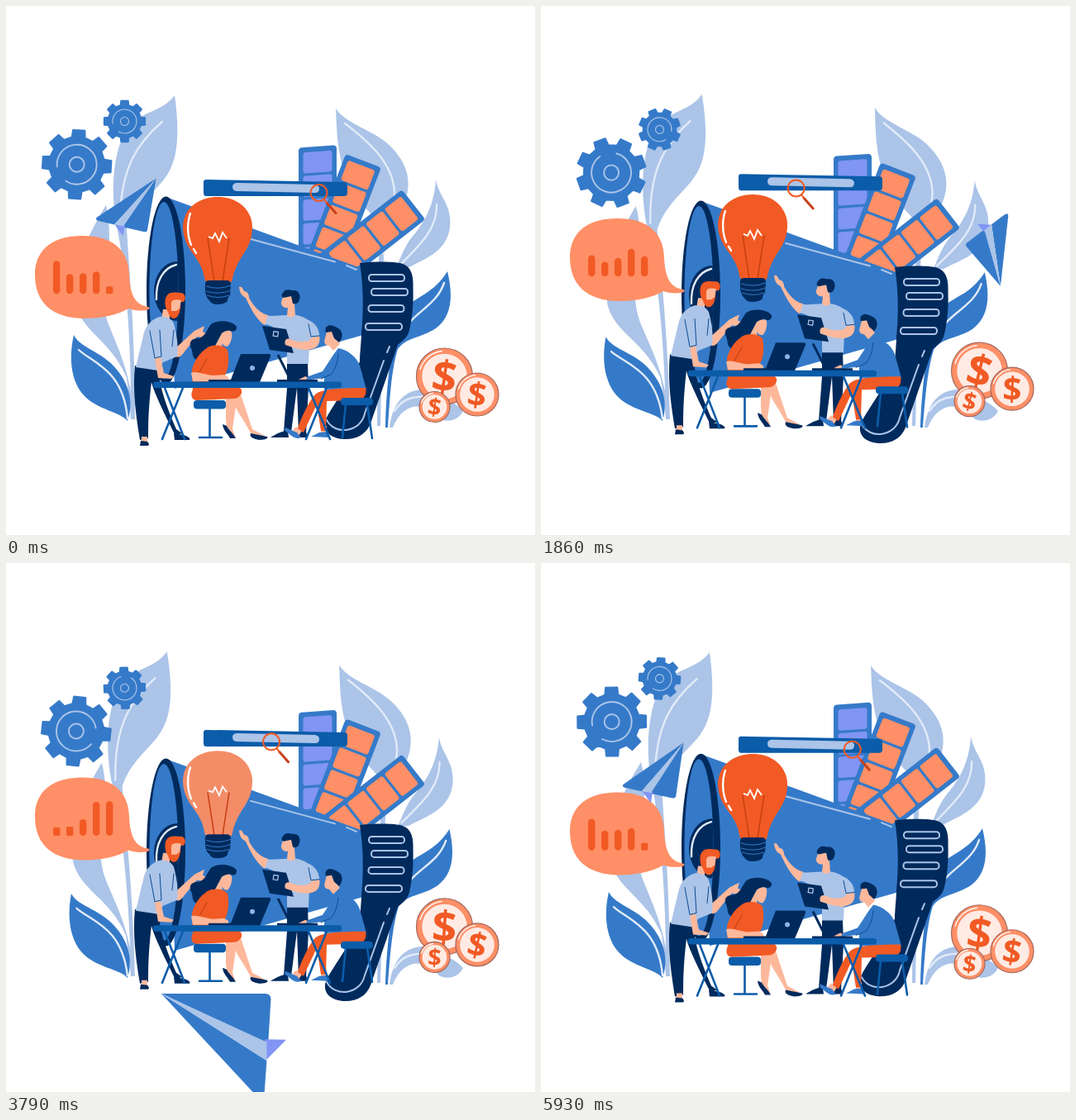
Animation, 640 px wide and 640 px high, one loop 6 s. Source, as an HTML page:

```html
<!DOCTYPE html>
<html lang="en">
<head>
<meta charset="utf-8">
<title>Team and megaphone</title>
<style>
html,body{margin:0;width:100%;height:100%;overflow:hidden;background:#fff}
svg{display:block;width:100%;height:100%}
.b{fill:#357ac9}.l{fill:#abc4e8}.n{fill:#002a5c}.m{fill:#0b5ca9}
.o{fill:#f15a24}.p{fill:#ff8f66}.s{fill:#fdb89b}.v{fill:#8095f4}
.ll,.lw,.lm,.ln{fill:none;stroke-linecap:round;stroke-linejoin:round}
.ll{stroke:#abc4e8;stroke-width:2}
.lw{stroke:#e1ebf8;stroke-width:2.4}
.lm{stroke:#0b5ca9;stroke-width:2.6}
.ln{stroke:#0b4c94;stroke-width:1}
text{font:bold 50px "Open Sans","Noto Sans",sans-serif;text-anchor:middle;fill:#f15a24}
</style>
</head>
<body>
<svg viewBox="0 0 640 640">
<g data-sway="-1.7" data-root="154 500"><path class="l" d="M121 241C100 275 78 320 84 360C92 395 128 405 146 450Q150 475 151 500H154C153 450 138 420 124 385C110 350 122 300 125 290C125 270 125 255 121 241Z"/></g>
<g id="tall"><path class="l" d="M204 108C208 135 210 170 201 192C190 222 160 232 146 270C150 330 156 400 156 500H151C152 420 146 320 133 262C126 220 130 165 152 142C166 128 192 126 204 108Z"/><path class="lw" d="M189 140C160 165 138 195 138 262"/></g>
<g data-sway="-2.4" data-root="148 502"><path class="b" d="M82 398C90 415 120 418 138 445C152 465 153 485 147 502C140 492 110 488 95 472C76 452 77 420 82 398Z"/><path class="lw" d="M88 416C105 432 142 440 147 499"/></g>
<g data-sway=".9" data-root="452 505"><path class="l" d="M399 124C412 145 450 150 470 175C492 200 489 225 479 245C468 265 460 270 457 300L453 508H449L451 300C450 280 452 270 445 255C425 235 412 215 406 190C400 165 400 145 399 124Z"/><path class="lw" d="M410 142C440 165 468 190 470 225C470 250 458 270 457 300"/></g>
<g data-sway="1.1" data-root="465 505"><path class="l" d="M520 210C524 232 540 240 537 268C533 300 500 308 484 318H472C480 296 486 285 495 275C508 258 518 240 520 210Z"/><path class="lw" d="M521 240C522 270 500 290 476 314"/></g>
<g data-sway="1.1" data-root="462 505"><path class="b" d="M534 321C541 350 540 375 520 390C500 403 485 400 474 415C466 440 464 480 462 510H459C460 460 466 400 480 370C490 352 515 352 534 321Z"/><path class="lw" d="M530 335C520 365 490 370 477 400"/></g>
<path class="l" d="M464 510C468 478 484 462 512 464C530 475 545 480 553 490C546 503 532 504 524 499C508 478 480 478 468 510Z"/><path class="lw" d="M470 490C480 474 495 470 520 474"/>

<g id="gearA"></g><g id="gearB"></g>
<g id="fan"></g>

<g id="horn">
<path class="b" d="M196 232L432 318V398L204 463Z"/>
<path class="ll" d="M296 282L398 309.5M412 314L424 319"/>
<ellipse class="n" cx="193.5" cy="344" rx="23.5" ry="113.5"/>
<clipPath id="mouth"><ellipse cx="191" cy="344" rx="17.5" ry="107"/></clipPath>
<g clip-path="url(#mouth)"><path class="b" d="M170 230h50v230h-50z"/><ellipse class="n" cx="207" cy="345" rx="28" ry="36"/><path class="lw" d="M206 313C190 317 181 333 182 355"/></g>
<path class="n" d="M428 311C450 309 470 309 480 312C490 316 493 325 492.500 340C493 360 492 375 488 392C486 402 478 406 474 410L441 505C436 518 424 525 408 524C390 523 383 512 387 500C392 488 420 450 428 430C428 420 430 405 430 395C433 365 432 335 428 311Z"/>
<g class="ll"><rect x="439" y="325" width="43" height="8" rx="3.500"/><rect x="442" y="342" width="44" height="8" rx="3.500"/><rect x="438.500" y="362" width="43" height="8" rx="3.500"/><rect x="435" y="384" width="44" height="8" rx="3.500"/></g>
<path class="ll" d="M464 412L461 419M457 429L434 493C429 516 398 520 388 501"/>
</g>

<g id="bulb">
<path id="glass" d="M256 231C282 231 299 248 298 270C297 296 280 302 274 330C273 337 266 338 257 338C248 338 241 336 240 329C236 302 215 297 214 268C214 246 232 231 256 231Z"/>
<path d="M244 281L252 333M270 281L262 333" fill="none" stroke="#c63f10" stroke-width="1.5"/>
<path d="M245 279L250 281L253 275L258 285L262 274L267 281" fill="none" stroke="#fff" stroke-width="1.800"/>
<path class="lw" style="stroke:#fff" d="M223 251C219 262 219 277 224 289M227 294L230 299"/>
<path class="n" d="M241 336Q241 332 246 332H267Q272 332 272 337L271 350Q268 352 268 357Q264 361 256 361Q248 361 246 356Q240 352 241 336Z"/>
<path d="M242 339Q257 344 272 338M242 345Q257 350 272 344M243 350Q257 355 270 350" fill="none" stroke="#357ac9"/>
</g>

<g id="search"><path class="m" d="M242 210L410 213Q413 213 413 217V226Q413 230 409 230H242Q239 230 239 226V213Q239 210 242 210Z"/><path class="l" d="M280 214L374 216Q379 217 379 221Q379 226 374 226L280 224Q274 224 274 219Q274 214 280 214Z"/></g>
<g id="lens" fill="none" stroke-linecap="round"><path d="M388 238L399 250.500" stroke="#c6421a" stroke-width="3"/><path d="M385 234L388 238" stroke="#f15a24" stroke-width="2"/><circle cx="378.500" cy="226" r="10" stroke="#f15a24" stroke-width="2"/></g>

<g id="bubble"><path class="p" d="M90 278C125 277 148 292 149 325C150 352 158 362 172 364C175 365 174 367 170 368C160 369 154 368 148 366C135 374 115 378 95 378C55 378 35 358 35 325C35 300 50 279 90 278Z"/><g id="bars" class="o"></g></g>

<g id="team">
<path class="n" d="M340 432H365L366 462L363 517H354L352 462L345 516L336 515L340 462Z"/>
<path class="n" d="M320 522C328 517 334 514 341 514L342 522ZM355 515H363L365 522H354Z"/>
<path class="l" d="M314 374C320 376 330 374 340 374H352C362 376 370 382 373 390L367 410L366 433H340V405C335 398 325 386 312 385Z"/>
<path class="s" d="M313 386C303 380 294 362 290 353C284 350 283 346 282 340C284 338 287 342 288 345C292 345 294 349 294 353C300 364 308 372 317 374Z"/>
<path class="s" d="M335 352L346 351L349 361L350 374C346 378 341 376 340 374L341 365C336 366 332 362 333 358Z"/>
<path class="n" d="M335 347C338 341 344 344 347 344C354 343 357 350 355 355C354 360 350 361 347 360L345 351L336 353C333 352 333 349 335 347Z"/>
<path d="M329 422L341 446" stroke="#002a5c" stroke-width="3"/>
<path class="n" d="M310 387L339 391L348 420L319 416Z"/>
<rect class="ll" x="323.500" y="394" width="5.500" height="5.500" style="stroke-width:1.300" transform="rotate(8 326 397)"/>
<path class="s" d="M373 388C380 395 382 406 376 412C366 420 350 414 338 410C336 404 340 400 346 404C356 408 366 406 369 403L364 398Z"/>
<path class="l" d="M356 378C370 378 379 388 379 399L367 402Z"/><path class="ln" d="M366 385L369 400L379 399"/>

<path class="n" d="M156 435L186 441C184 455 192 480 206 512L213 517L205 520C190 490 178 465 176 455C173 480 172 500 172 523L162 525C157 495 153 465 156 435Z"/>
<path class="s" d="M164 521H171V528H164ZM190 367H198V382L188 380Z"/>
<path class="n" d="M163 526L171 527C174 530 173 532 171 532H162ZM203 517L214 519C219 520 224 523 222 525H204Z"/>
<path class="s" d="M202 421C208 428 212 424 216 418L231 400L244 402L246 398L238 394L240 387L228 393L205 414Z"/>
<path class="l" d="M186 376C178 378 170 385 167 395L157 437L184 441L190 431L207 424C209 410 206 395 203 384C200 378 194 375 186 376Z"/>
<path class="s" d="M180 426L187 425L191 444L203 448L200 451L184 450Z"/>
<path class="ln" d="M174 393L180 426L188 424L186 392M203 392L201 412"/>
<path class="o" d="M195 350C198 345 207 347 210 347C216 346 219 353 215 358H211C212 365 210 374 206 377C201 380 197 375 196 370C192 366 191 354 195 350Z"/>
<path class="s" d="M200 359C201 354 208 355 212 356L210 366L206 369L200 369Z"/>

<path class="s" d="M266 474C272 470 284 464 286 476L298 512L313 520L298 521C288 500 280 492 278 485L274 512L277 520L268 518L266 500Z"/>
<path class="n" d="M262 506L267 508C270 514 276 518 278 523H271C268 517 263 514 262 506ZM296 517L316 521C318 524 312 525 306 525C300 524 294 522 296 517Z"/>
<rect class="m" x="227" y="477" width="39" height="10.500" rx="4"/><path class="lm" d="M246.500 487V521M234 522H261"/>
<path class="n" d="M248 385C256 379 274 380 279 388C280 394 273 395 270 392C262 397 262 406 258 412C252 424 240 428 230 428C224 424 227 420 224 414C220 406 226 402 232 402C240 402 244 390 248 385Z"/>
<path class="s" d="M261 396C266 392 272 392 273 395C274 401 272 408 268 412C264 412 262 409 261 408L262 415L252 413Z"/>
<path class="o" d="M244 413C252 409 263 410 268 416C270 425 270 440 264 448L283 462C288 466 284 474 276 475L231 477C224 477 223 470 226 464L225 440C228 428 235 419 244 413Z"/>
<path class="s" d="M224 444C228 441 240 446 250 447L264 446L269 449V454H226Z"/>
<path d="M234 443L243 427" stroke="#b63a14"/>

<path class="s" d="M381 508H388V518H381ZM351 509L358 514L354 520L347 513ZM354 452L362 448L368 451L364 455Z"/>
<path class="b" d="M402 414C413 416 424 424 428 435L436 464H385V450L362 453L366 448L383 442L396 422Z"/><path class="ln" d="M402 421C401 432 398 440 393 446L381 451"/>
<path class="s" d="M388 394H395L399 403L404 409L396 417L391 411C386 411 384 407 386 402Z"/>
<path class="n" d="M388 388C392 384 398 388 402 390C408 393 408 402 403 407L397 402L394 394L387 395C386 392 386 390 388 388Z"/>
<path class="o" d="M435 462C437 472 432 476 425 477L388 478L387 514H381L376 482L360 516L353 511C358 496 368 476 374 470C380 464 400 462 435 462Z"/>
<path class="b" d="M338 510L352 516L357 522C350 526 342 517 337 513ZM369 521L379 516L389 515L390 522Z"/>
<rect class="m" x="405" y="474" width="39" height="9" rx="4"/><path class="lm" d="M411 482L407 522M437 482L443 523"/>
<path class="n" d="M284 421H318Q321 421 320 424L307 455H245V452H272ZM328 452H377V455H328Z"/><circle cx="298" cy="438" r="3" fill="#8fb3e4"/>
<path class="lm" d="M214 462L189 524M192 462L216 524M388 462L363 524M366 462L392 524"/>
<rect class="m" x="178" y="454.500" width="228" height="7.500" rx="3"/>
</g>

<g id="coins"></g>
<g id="plane"><path class="b" d="M0 0L90 -74Q95 -78 99 -73L128 -33Z"/><path class="v" d="M122 -34L141 -49L138 -17Z"/><path class="b" d="M0 0L139 -17L161 14Q164 21 157 21Z"/><path class="l" d="M0 0L126 -33L139 -17Z"/></g>
</svg>
<script>
const LOOP = 6000, TAU = Math.PI * 2;
const $ = id => document.getElementById(id);
const place = (id, v) => $(id).setAttribute('transform', v);
const shift = (id, y, x = 0) => place(id, `translate(${x} ${y})`);

// Rises from 0 to 1 between start and top, falls back between fall and end
const pulse = (t, start, top, fall, end) =>
  Math.max(0, Math.min(1, (t - start) / (top - start), (end - t) / (end - fall)));
// One linear rise and fall per loop
const ramp = (t, peak) => pulse(t, 0, peak, peak, LOOP);

function gear(id, r, root, ring, hub) {
  const pts = [];
  for (let i = 0; i < 8; i++)
    for (const [a, d] of [[-.24, root], [-.17, r], [.17, r], [.24, root]]) {
      const q = i * TAU / 8 + a;
      pts.push(d * Math.cos(q) + ' ' + d * Math.sin(q));
    }
  $(id).innerHTML = `<path class="b" d="M${pts.join('L')}Z" stroke="#357ac9" stroke-width="2" stroke-linejoin="round"/>
    <circle class="ll" r="${ring}" pathLength="360" stroke-dasharray="310 50" transform="rotate(170)" style="stroke-width:${r / 22}"/>
    <circle class="ll" r="${hub}" style="stroke-width:${r / 22}"/>`;
}
gear('gearA', 42, 33.5, 24, 9);
gear('gearB', 25, 20, 14.5, 5);

function card(pose, cell) {
  let s = `<g transform="${pose}"><rect class="b" width="46" height="145" rx="4"/>`;
  for (let i = 0; i < 5; i++)
    s += `<rect class="${cell}" x="5.5" y="${6 + i * 28.7}" width="35" height="25.5" rx="3"/>`;
  return s + '</g>';
}
$('fan').innerHTML = card('translate(354 171.500) skewY(-4)', 'v') +
  card('translate(411 179) rotate(21)', 'p') +
  card('translate(479 222) rotate(52)', 'p');

// Each bar: resting and opposite height
const bars = [[40, 10], [24, 11], [25, 20], [27, 41], [9, 42]];
$('bars').innerHTML = bars.map((_, i) => `<rect x="${57 + i * 16}" width="8.4"/>`).join('');

const coins = [[530.5, 448, 34], [570, 470, 26], [518.5, 485, 18.5]];
$('coins').innerHTML = coins.map(([x, y, r]) => `<g transform="translate(${x} ${y})">
  <circle class="p" r="${r}" stroke="#a5665a" stroke-width="1.2"/>
  <circle r="${r * .8}" fill="#ffebe4"/>
  <circle r="${r * .9}" fill="none" stroke="#fff" stroke-width="1.3" pathLength="360" stroke-dasharray="70 290" transform="rotate(195)"/>
  <text dy=".36em" style="font-size:${r * 1.55}px">$</text></g>`).join('');

// The plane circles the scene on an ellipse, growing as it nears the viewer
function fly(t) {
  const q = t / LOOP * TAU;
  const orbit = 219 + t / LOOP * 360 + 10 * (1 - Math.cos(q)) - 6 * Math.sin(q);
  const a = orbit * TAU / 360;
  const turn = orbit - 80 + 16 * ramp(t, 3000) + 35 * pulse(t, 3800, 4800, 4800, LOOP);
  const size = .54 + .54 * pulse(t, 1900, 3300, 3800, LOOP);
  place('plane', `translate(${333 + 230 * Math.cos(a)} ${370 + 203 * Math.sin(a)})
    rotate(${turn}) scale(${size}) translate(-79 14)`);
}

function draw(t) {
  const u = t / LOOP, rise = ramp(t, 3000);
  const sway = .22 * (1 - Math.cos(u * TAU)) + .3 * (1 - Math.cos(2 * u * TAU));

  document.querySelectorAll('[data-sway]').forEach(leaf =>
    leaf.setAttribute('transform', `rotate(${leaf.dataset.sway * sway} ${leaf.dataset.root})`));
  place('tall', `rotate(${-.95 * (sway + rise)} 152 500)`);

  place('gearA', `translate(${85.7 - rise} ${191.7 + 16 * rise}) rotate(${u * 360 + 3.5})`);
  place('gearB', `translate(143.500 ${139.5 + 16 * rise}) rotate(${-u * 360})`);
  shift('fan', 14.5 * ramp(t, 2600));
  shift('horn', 8 * rise);
  shift('bulb', -5 * rise);
  shift('search', -11 * rise);
  shift('lens', -11 * pulse(t, 1100, 2600, 3500, LOOP), -78 * pulse(t, 1100, 1950, 3000, LOOP));
  shift('team', -22 * rise);
  shift('coins', -11 * rise);
  shift('bubble', -28.7 * ramp(t, 2550));

  const pale = pulse(t, 2450, 3700, 4900, 5750);
  $('glass').setAttribute('fill', `rgb(${241 + 2 * pale},${90 + 51 * pale},${36 + 68 * pale})`);

  bars.forEach(([rest, other], i) => {
    const h = rest + (other - rest) * pulse(t, 1100, 2700, 4900 - 280 * i, LOOP - 200 * i);
    const bar = $('bars').children[i];
    bar.setAttribute('y', 348.3 - h);
    bar.setAttribute('height', h);
    bar.setAttribute('rx', h < 15 ? 2 : 4.2);
  });
  coins.forEach((_, i) => {
    const tilt = 8 + 6 * (-1) ** i * Math.sin(u * TAU);
    $('coins').children[i].lastElementChild.setAttribute('transform', `rotate(${tilt})`);
  });
  fly(t);
}

const start = performance.now();
function frame() {
  draw((performance.now() - start) % LOOP);
  requestAnimationFrame(frame);
}
frame();
</script>
</body>
</html>
```
